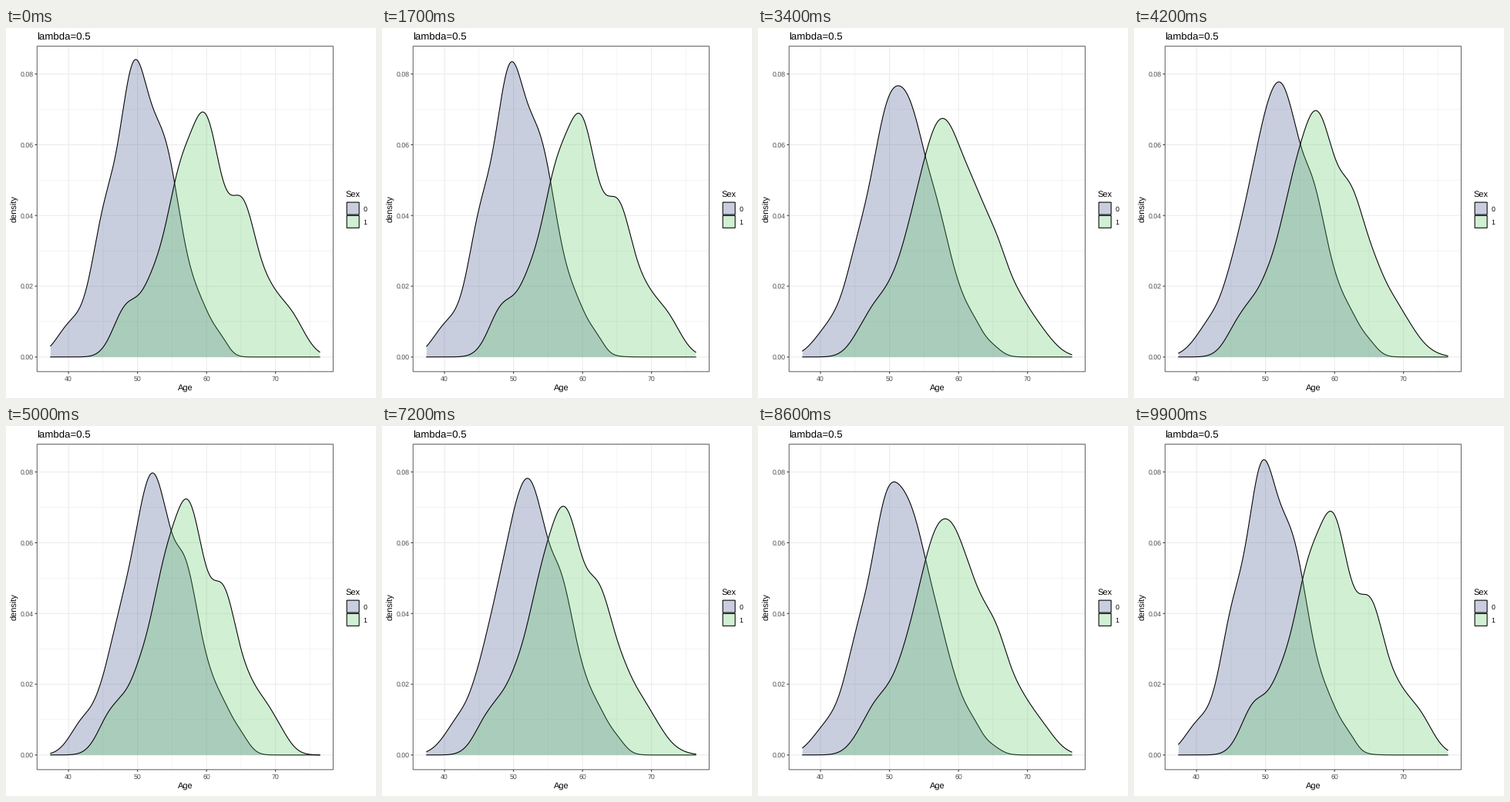
Recreate the animation shown at these times as a matplotlib script. Size 480x480 px, loop 10 s.

```python
import numpy as np
import matplotlib.pyplot as plt
from matplotlib.animation import FuncAnimation
from matplotlib.patches import Polygon, Rectangle

plt.rcParams["font.family"] = "Liberation Sans"
plt.rcParams["text.hinting"] = "none"
plt.rcParams["path.snap"] = False

SIZE = 480
FRAMES, HOLD, HALF = 100, 16, 50
LEFT, RIGHT, TOP, BOTTOM = 40.3, 424.4, 23.6, 445.8
X0, X1, BASE = 57.8, 407.0, 426.8
AGE_MIN, AGE_MAX = 37.4, 76.4
PX_AGE = (X1 - X0) / (AGE_MAX - AGE_MIN)
PX_DENS = 4589
BLUE, GREEN, ALPHA = "#3B528B", "#5DC863", 0.28
SHIFT = 0.25  # share of the way each group moves towards the other

# Gaussian bumps: centre, spread, height in 1e-4
BLUE_BUMPS = [(40.5, 2.1, 92), (45.2, 1.9, 349), (49.3, 2.0, 684),
              (53.8, 2.5, 573), (59.2, 1.9, 113), (62.2, 1.1, 26)]
GREEN_BUMPS = [(48.4, 1.9, 135), (52.3, 1.8, 170), (55.8, 1.9, 366),
               (59.85, 2.3, 636), (65.3, 2.1, 401), (69.0, 1.6, 83),
               (71.8, 2.2, 124)]


def mixture(bumps, age):
    return sum(h * 1e-4 * np.exp(-((age - c) / s) ** 2 / 2)
               for c, s, h in bumps)


def repaired(own, other, age):
    """Density after moving each quantile of own towards that of other."""
    grid = np.linspace(28, 86, 4000)
    f, g = mixture(own, grid), mixture(other, grid)
    cf, cg = np.cumsum(f) / f.sum(), np.cumsum(g) / g.sum()
    partner = np.interp(cf, cg, grid)
    g = mixture(other, partner)
    moved = (1 - SHIFT) * grid + SHIFT * partner
    dens = 1 / ((1 - SHIFT) / (f + 1e-12) + SHIFT / (g + 1e-12))
    return np.interp(age, moved, dens)


def age_x(age):
    return X0 + (age - AGE_MIN) * PX_AGE


def dens_y(d):
    return BASE - d * PX_DENS


fig = plt.figure(figsize=(SIZE / 72, SIZE / 72), dpi=72, facecolor="white")
ax = fig.add_axes([0, 0, 1, 1])
ax.set_xlim(0, SIZE)
ax.set_ylim(SIZE, 0)
ax.axis("off")


def seg(xs, ys, color="#333333", lw=1.07, z=1):
    ax.plot(xs, ys, color=color, lw=lw, zorder=z, solid_capstyle="butt")


def grid_line(xs, ys, major):
    seg(xs, ys, "#EBEBEB", 1.07 if major else .53, 1.5 if major else 1)


def label(x, y, s, size, color="black", ha="left", **kw):
    ax.text(x, y, s, fontsize=size, color=color, ha=ha, va="baseline", **kw)


def box(x, y, w, h, **kw):
    ax.add_patch(Rectangle((x, y), w, h, joinstyle="miter", **kw))


# Grid, ticks and tick labels
for age in range(40, 80, 5):
    x, major = age_x(age), age % 10 == 0
    grid_line([x, x], [TOP, BOTTOM], major)
    if major:
        seg([x, x], [BOTTOM, BOTTOM + 2.75])
        label(x, 458.3, str(age), 8.8, "#4D4D4D", "center")

for k in range(9):
    y, major = dens_y(k / 100), k % 2 == 0
    grid_line([LEFT, RIGHT], [y, y], major)
    if major:
        seg([LEFT - 2.75, LEFT], [y, y])
        label(35.3, y + 3.2, f"{k / 100:.2f}", 8.8, "#4D4D4D", "right")

box(LEFT, TOP, RIGHT - LEFT, BOTTOM - TOP, fill=False, ec="#666666",
    lw=1.07, zorder=8)

# Titles
label(40.3, 15, "lambda=0.5", 13.2)
label(232.7, 470, "Age", 11, ha="center")
label(14.1, 234.4, "density", 11, ha="center", rotation=90,
      rotation_mode="anchor")

# Legend
label(440.8, 218.5, "Sex", 11)
for i, color in enumerate((BLUE, GREEN)):
    y = 226.1 + 17.2 * i
    box(442.1, y, 16, 16, fc=color, alpha=ALPHA, lw=0)
    box(442.1, y, 16, 16, fill=False, ec="black", lw=1.07)
    label(463.7, 237.5 + 17.2 * i, str(i), 8.8)


class Density:
    age = np.linspace(AGE_MIN, AGE_MAX, 512)

    def __init__(self, own, other, color, z):
        self.start = mixture(own, self.age)
        self.end = repaired(own, other, self.age)
        self.x = age_x(self.age)
        self.area = Polygon([(X0, BASE), (X1, BASE)], fc=color, alpha=ALPHA,
                            lw=0, zorder=z)
        ax.add_patch(self.area)
        self.line, = ax.plot([], [], color="black", lw=1.07, zorder=z + .5)

    def show(self, t):
        y = dens_y(self.start + (self.end - self.start) * t)
        self.line.set_data(self.x, y)
        self.area.set_xy(np.column_stack([np.r_[self.x, X1, X0],
                                          np.r_[y, BASE, BASE]]))


curves = [Density(BLUE_BUMPS, GREEN_BUMPS, BLUE, 3),
          Density(GREEN_BUMPS, BLUE_BUMPS, GREEN, 5)]


def update(n):
    """Hold, then tween linearly; the second half runs back."""
    t = max(0, n % HALF - HOLD) / (HALF - HOLD)
    if n >= HALF:
        t = 1 - t
    for c in curves:
        c.show(t)
    return [a for c in curves for a in (c.area, c.line)]


anim = FuncAnimation(fig, update, frames=FRAMES, interval=100, repeat=True,
                     repeat_delay=0, blit=False)
plt.show()
```
